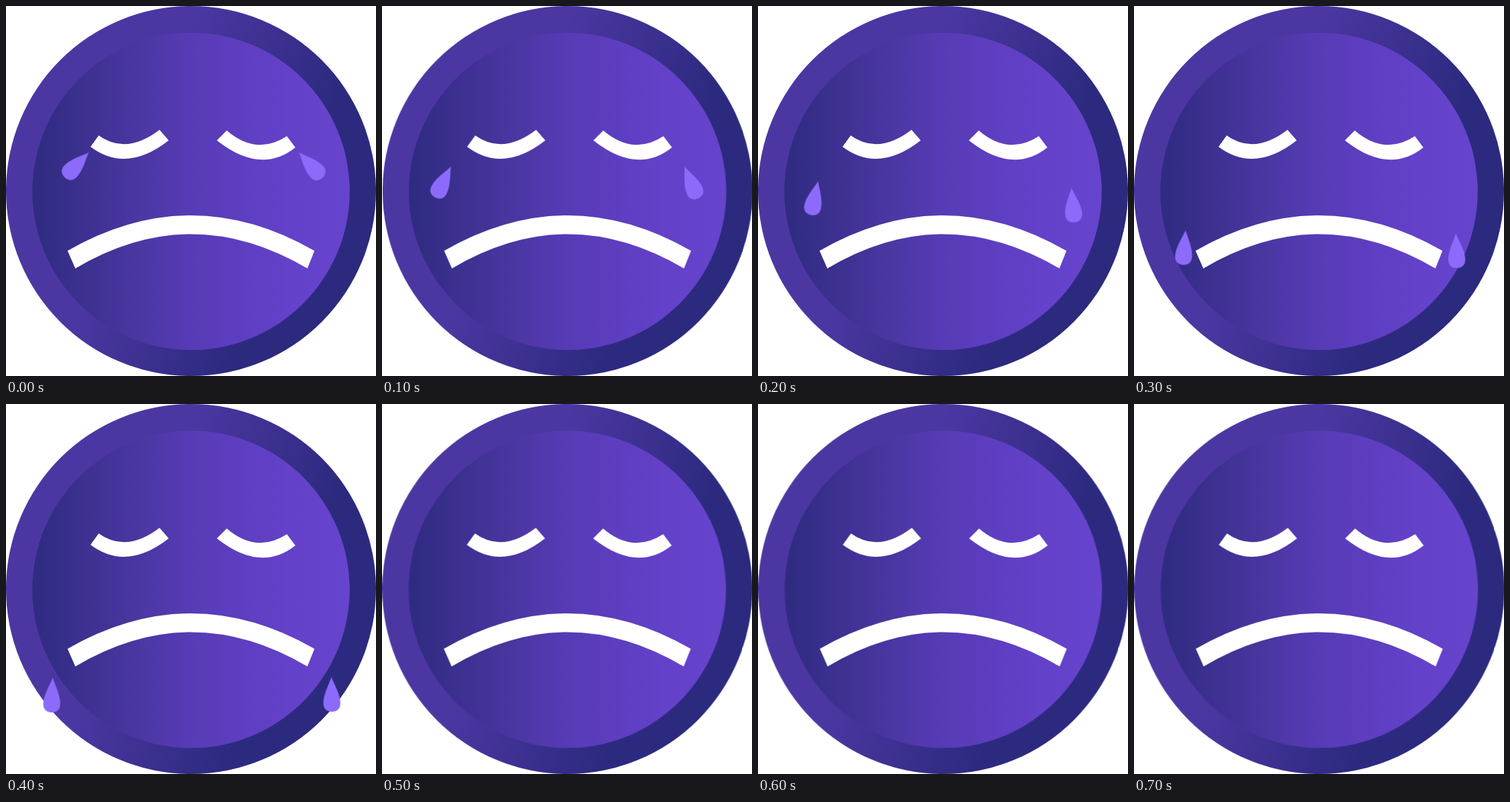
These frames come from a looping animation (523x523 px, 800 ms). An HTML page:

```html
<!DOCTYPE html>
<html lang="en">
<head>
<meta charset="utf-8">
<title>Crying face</title>
<style>
html, body { margin: 0; width: 100%; height: 100%; overflow: hidden; background: #fff; }
svg { display: block; width: 100vw; height: 100vh; }
.face, .tear { animation: 800ms step-end infinite; }
.face { animation-name: sway; }
.tear { fill: #8c6bfa; }
.left { animation-name: fall-left; }
.right { animation-name: fall-right; }

@keyframes sway {
  0% { transform: none; }
  12.5% { transform: translate(.8px, 0); }
  25% { transform: none; }
  62.5%, 100% { transform: translate(.4px, 0); }
}
@keyframes fall-left {
  0% { transform: translate(117px, 207px) rotate(44deg); visibility: visible; }
  12.5% { transform: translate(97.5px, 227px) rotate(27deg); }
  25% { transform: translate(85px, 247.5px) rotate(12deg); }
  37.5% { transform: translate(73px, 317px) rotate(4.5deg); }
  50% { transform: translate(66px, 387px) rotate(2deg); visibility: visible; }
  62.5%, 100% { transform: translate(66px, 387px) rotate(2deg); visibility: hidden; }
}
@keyframes fall-right {
  0% { transform: translate(414px, 207px) rotate(-43deg); visibility: visible; }
  12.5% { transform: translate(427.5px, 227px) rotate(-23deg); }
  25% { transform: translate(443px, 257px) rotate(-5deg); }
  37.5% { transform: translate(455px, 321.5px) rotate(-2deg); }
  50% { transform: translate(460px, 386px) rotate(-1deg); visibility: visible; }
  62.5%, 100% { transform: translate(460px, 386px) rotate(-1deg); visibility: hidden; }
}
</style>
</head>
<body>
<svg viewBox="0 0 523 523">
  <defs>
    <linearGradient id="rim" gradientUnits="userSpaceOnUse" x1="178" y1="229" x2="392" y2="314">
      <stop offset="0" stop-color="#4c37a2"/>
      <stop offset="1" stop-color="#2c2a7f"/>
    </linearGradient>
    <linearGradient id="skin" gradientUnits="userSpaceOnUse" x1="37" y1="262" x2="486" y2="262">
      <stop offset="0" stop-color="#2e2b80"/>
      <stop offset=".32" stop-color="#4a36a0"/>
      <stop offset=".5" stop-color="#573bb6"/>
      <stop offset=".8" stop-color="#6341c9"/>
      <stop offset="1" stop-color="#6644cd"/>
    </linearGradient>
    <path id="drop" d="M0 0C3 9 12 24 12 37C12 45 7 49 0 49C-7 49 -12 45 -12 37C-12 24 -3 9 0 0Z"/>
  </defs>
  <g class="face">
    <circle cx="261.5" cy="261.5" r="261.5" fill="url(#rim)"/>
    <circle cx="261.5" cy="262" r="224.3" fill="url(#skin)"/>
    <g fill="#fff">
      <path d="M131 183Q170 211 217 175L230 190Q170 237 119.5 199Z"/>
      <path d="M312 176Q354 212 397 184L409 200Q360 239 298 190Z"/>
      <path d="M87 346Q261.5 246 436 346L426 371Q261.5 274 98 371Z"/>
    </g>
  </g>
  <use class="tear left" href="#drop"/>
  <use class="tear right" href="#drop"/>
</svg>
</body>
</html>
```
